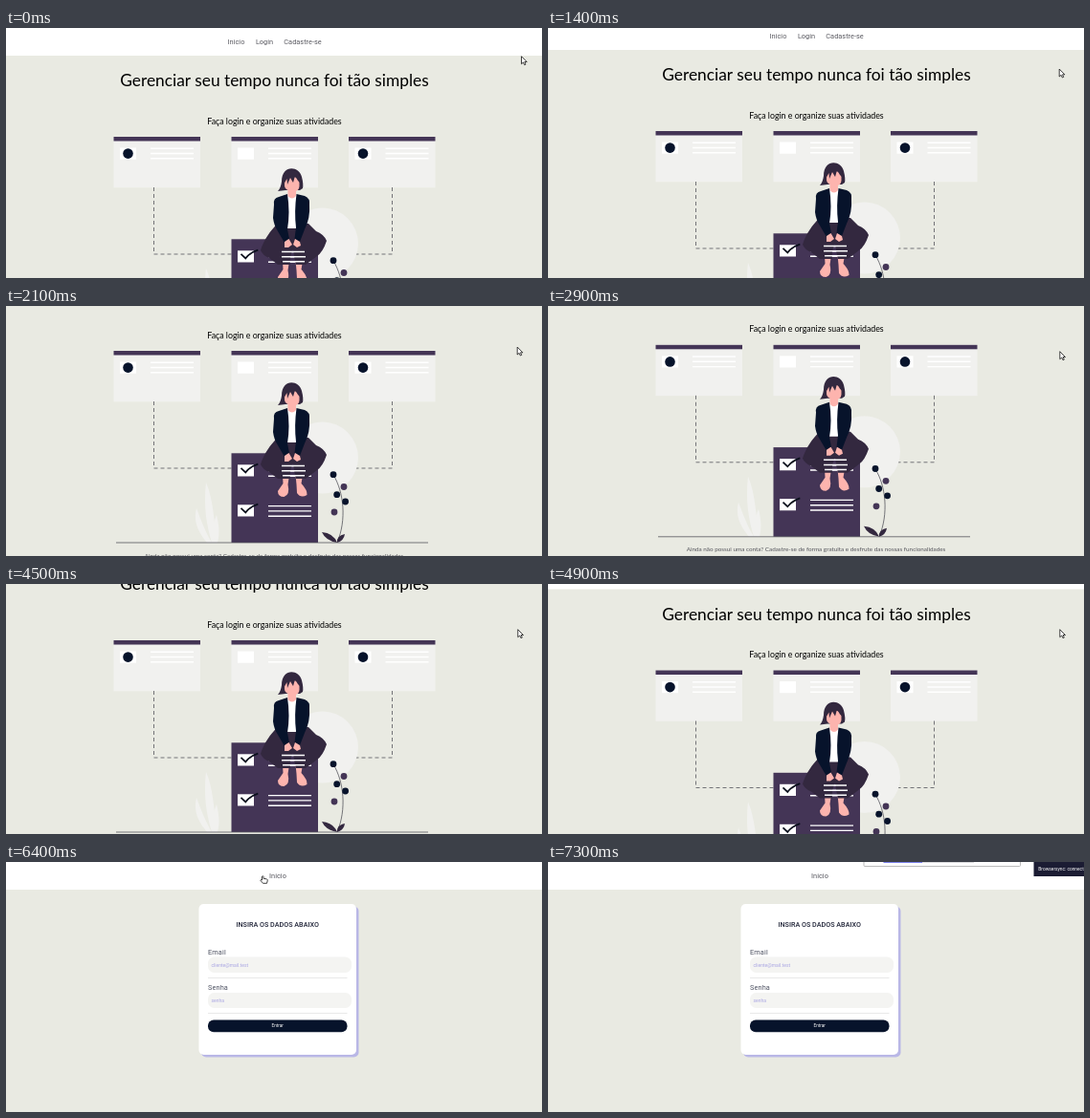
Write an HTML page that moves like this. It is 560 px wide and 262 px high and loops after 8 s.

```html
<!DOCTYPE html>
<html lang="pt-BR">
<head>
<meta charset="utf-8">
<title>Gerenciar tempo</title>
<style>
  html, body { margin: 0; width: 100%; height: 100%; overflow: hidden; background: #e9eae2; }
  svg { display: block; width: 100%; height: 100%; }
  text { font-family: Roboto, sans-serif; }
  .lato { font-family: Lato, sans-serif; text-anchor: middle; }
  .nav { font-size: 7.4px; fill: #5b5b62; text-anchor: middle; }
  .label { font-size: 7.3px; letter-spacing: .15px; fill: #4c5060; }
  .hint { font-size: 5px; fill: #a9a5e2; }
  .dark { fill: #07132b; }
  .purple { fill: #443556; }
  .hair { fill: #33283f; }
  .skin { fill: #fdb4ae; }
  .pale { fill: #f1f1ef; }
  .white { fill: #fff; }
  .line { fill: none; stroke: #fff; stroke-width: 1.4; }
  .ink { fill: none; stroke: #55555c; stroke-width: .8; }
  .check { fill: none; stroke: #0a0f1c; stroke-width: 1.7; }
</style>
</head>
<body>
<svg viewBox="0 0 560 262">
  <rect width="560" height="262" fill="#e9eae2"/>

  <g id="home">
    <rect class="white" width="560" height="29"/>
    <text class="nav" x="240.5" y="17">Inicio</text>
    <text class="nav" x="270" y="17">Login</text>
    <text class="nav" x="310" y="17">Cadastre-se</text>
    <text class="lato" x="280.5" y="61" font-size="17.35">Gerenciar seu tempo nunca foi tão simples</text>
    <text class="lato" x="280.5" y="100.7" font-size="8.8">Faça login e organize suas atividades</text>

    <g id="cards"></g>
    <path class="ink" stroke-dasharray="4 3" d="M154.5 167V237H403.5V167"/>
    <circle class="pale" cx="330.5" cy="226" r="37.5"/>

    <g class="pale">
      <path d="M209 252C206 278 210 298 215 315H221C217 294 217 270 209 252Z"/>
      <path d="M199 279C195 295 203 306 210 315H215C208 303 204 292 199 279Z"/>
      <path d="M220 286C215 297 217 306 218 315H221C224 304 222 295 220 286Z"/>
    </g>

    <rect class="purple" x="235.5" y="221.3" width="90.5" height="93.7"/>
    <g id="tasks"></g>

    <path class="ink" d="M346 315C356 291 353 262 342 244"/>
    <g id="berries"></g>
    <path class="hair" d="M330 304Q342 305 346 315Q334 313 330 304ZM354 306Q345 308 346 315Q353 313 354 306Z"/>
    <path class="ink" d="M115 315H441"/>

    <g id="woman">
      <path class="skin" d="M289 244H296L294.5 254Q297 265 290.5 267Q284 267 284 261L289.5 253ZM302.5 244H310L308.5 253Q315 260 314.5 265Q308 269 304 263L303.5 254Z"/>
      <path class="hair" d="M284 205C276 212 269 223 266 233Q268 238 275 241L284 248H297Q296 239 300 232Q301 241 303 248H313Q320 243 325 239Q331 235 335 223Q332 216 324 213L316 205Z"/>
      <path class="line" d="M288 234.5H312M288 239.7H313M289 244.7H312"/>
      <path class="white" d="M293.5 175H304L305 210H293Z"/>
      <path class="hair" d="M288 161C288 143 306 144 309 156Q311 164 310 168L307 170H292L284 171Q287 168 288 161Z"/>
      <path class="skin" d="M291 158Q299 153 306.5 159V166Q306 170 303 171V176Q299 181 294.5 176V170Q291 168 291 165Z"/>
      <path class="hair" d="M290 164Q287 150 298 148Q308 149 308 163L305 160L302 155L300 162L297 157L294 164L293.5 158Z"/>
      <path class="dark" d="M294 174L285 177Q279 178 280 185L279 199Q280 207 284 213L291 225L296 221L294 211Q297 193 294 174Z"/>
      <path class="dark" d="M303.5 174L312 176Q318 178 317 186Q318 199 312 211L307 224L301.5 221L303 209Q301 193 303.5 174Z"/>
      <path class="skin" d="M291 224L295.5 221L299 227L295 230H291ZM307 224L302 221L300 227L304 230L308 228Z"/>
    </g>

    <text class="lato" x="280" y="330.5" font-size="6.33" fill="#55555c">Ainda não possui uma conta? Cadastre-se de forma gratuita e desfrute das nossas funcionalidades</text>
  </g>

  <g id="login">
    <rect class="white" width="560" height="29"/>
    <text class="nav" x="284" y="17">Inicio</text>
    <rect x="204" y="46.5" width="164.5" height="158" rx="5" fill="#b9b7e6"/>
    <rect class="white" x="201.5" y="44" width="164.5" height="158" rx="5"/>
    <text x="283.7" y="67.5" font-size="7.2" font-weight="500" text-anchor="middle" fill="#22263a">INSIRA OS DADOS ABAIXO</text>
    <text class="label" x="211" y="97">Email</text>
    <rect x="211" y="99.5" width="150" height="16.5" rx="6.5" fill="#f4f4f2"/>
    <text class="hint" x="214.5" y="109.7">cliente@mail.test</text>
    <text class="label" x="211" y="134.4">Senha</text>
    <rect x="211" y="137" width="150" height="16" rx="6.5" fill="#f4f4f2"/>
    <text class="hint" x="214.5" y="146.7">senha</text>
    <path d="M211 121.5H356.5M211 158.5H356.5" stroke="#e2e2e2" stroke-width=".8"/>
    <rect class="dark" x="211" y="165.5" width="145.5" height="12.7" rx="6"/>
    <text x="283.7" y="173.4" font-size="4.7" text-anchor="middle" fill="#fff">Entrar</text>
  </g>

  <g id="notice">
    <rect x="330" y="-5" width="163.5" height="9.5" rx="1" fill="#fff" stroke="#aaa" stroke-width=".8"/>
    <path d="M391 .3H445" stroke="#d5d5d8"/>
    <path d="M350.5 .3H391" stroke="#5b62e8"/>
    <rect x="507.5" y="0" width="52.5" height="15" fill="#1b1c33"/>
    <text x="512.3" y="9" font-size="4.85" fill="#fff">Browsersync: connected</text>
  </g>

  <g id="cursor">
    <path id="arrow" d="M0 0V8L1.9 6.3L3.2 9L4.5 8.4L3.3 5.8H5.7Z" fill="#fff" stroke="#111" stroke-width=".8"/>
    <path id="hand" d="M1 .8Q2 0 2.6 1V3L6 3.6Q7 4 6.7 5.5L6 8H2L-.6 5Q-.4 3.8 1 4.6Z" fill="#fff" stroke="#111" stroke-width=".8"/>
  </g>
</svg>
<script>
const LOOP = 8000, TICK = 100;
const byId = id => document.getElementById(id);
const rect = (cls, x, y, w, h) => `<rect class="${cls}" x="${x}" y="${y}" width="${w}" height="${h}"/>`;
const dot = (cls, x, y, r) => `<circle class="${cls}" cx="${x}" cy="${y}" r="${r}"/>`;
const rows = (x, y, w) => `<path class="line" d="${[0, 1, 2].map(i => `M${x} ${y + i * 5.3}h${w}`).join('')}"/>`;

byId('cards').innerHTML = [112.5, 235.5, 358].map((x, i) =>
  rect('pale', x, 114, 90.5, 53.3) + rect('purple', x, 114, 90.5, 4.5) +
  rect('white', x + 6.5, 125.5, 17, 12.2) + (i === 1 ? '' : dot('dark', x + 15, 131.6, 5.3)) +
  rows(x + 38.5, 126.2, 45)).join('');

byId('tasks').innerHTML = [233.3, 275.3].map(y =>
  rect('white', 242, y, 17, 12.2) + rows(274, y + 1.3, 45) +
  `<path class="check" d="M245.5 ${y + 3.5}l4.8 4.6q5-6.3 13-8.8"/>`).join('');

byId('berries').innerHTML = [
  ['dark', 342, 243.7], ['purple', 353, 256.5], ['dark', 345.7, 264.7], ['dark', 354.6, 272], ['purple', 343, 283]
].map(([cls, x, y]) => dot(cls, x, y, 3.4)).join('');

// [time, scroll offset]
const scrollKeys = [[1300, 0], [1400, 6], [1800, 43.5], [2000, 61], [2100, 67], [2600, 67], [2900, 73.2],
  [4400, 73.2], [4500, 55], [4900, 23.5], [5100, 10], [5300, 2], [5400, 0]];
// [time, x, y]
const cursorKeys = [[400, 538.5, 29.7], [900, 534.2, 43], [2200, 534.2, 43], [2300, 534.2, 44.5],
  [2400, 534.2, 44.5], [2500, 534.7, 47], [2600, 534.7, 47], [2900, 534.8, 47.7],
  [5400, 534.8, 47.7], [5800, 266.5, 14.3], [6600, 266.5, 14.3], [7300, 425, -12]];

function sample(keys, t) {
  const next = keys.findIndex(k => k[0] > t);
  if (next === 0) return keys[0].slice(1);
  if (next < 0) return keys[keys.length - 1].slice(1);
  const a = keys[next - 1], b = keys[next], f = (t - a[0]) / (b[0] - a[0]);
  return a.slice(1).map((v, i) => v + (b[i + 1] - v) * f);
}

const show = (id, on) => byId(id).setAttribute('visibility', on ? 'visible' : 'hidden');

function draw(now) {
  const t = Math.floor(now % LOOP / TICK) * TICK;
  const [scroll] = sample(scrollKeys, t);
  const [x, y] = sample(cursorKeys, t);
  const overLink = t >= 5800 && t < 6700;
  byId('home').setAttribute('transform', `translate(0 ${-scroll})`);
  byId('cursor').setAttribute('transform', `translate(${x} ${y})`);
  show('home', t < 6300);
  show('login', t >= 6300);
  show('notice', t >= 6500);
  show('arrow', !overLink && t < 7300);
  show('hand', overLink);
}

const start = performance.now();
function frame() {
  draw(performance.now() - start);
  requestAnimationFrame(frame);
}
frame();
</script>
</body>
</html>
```
